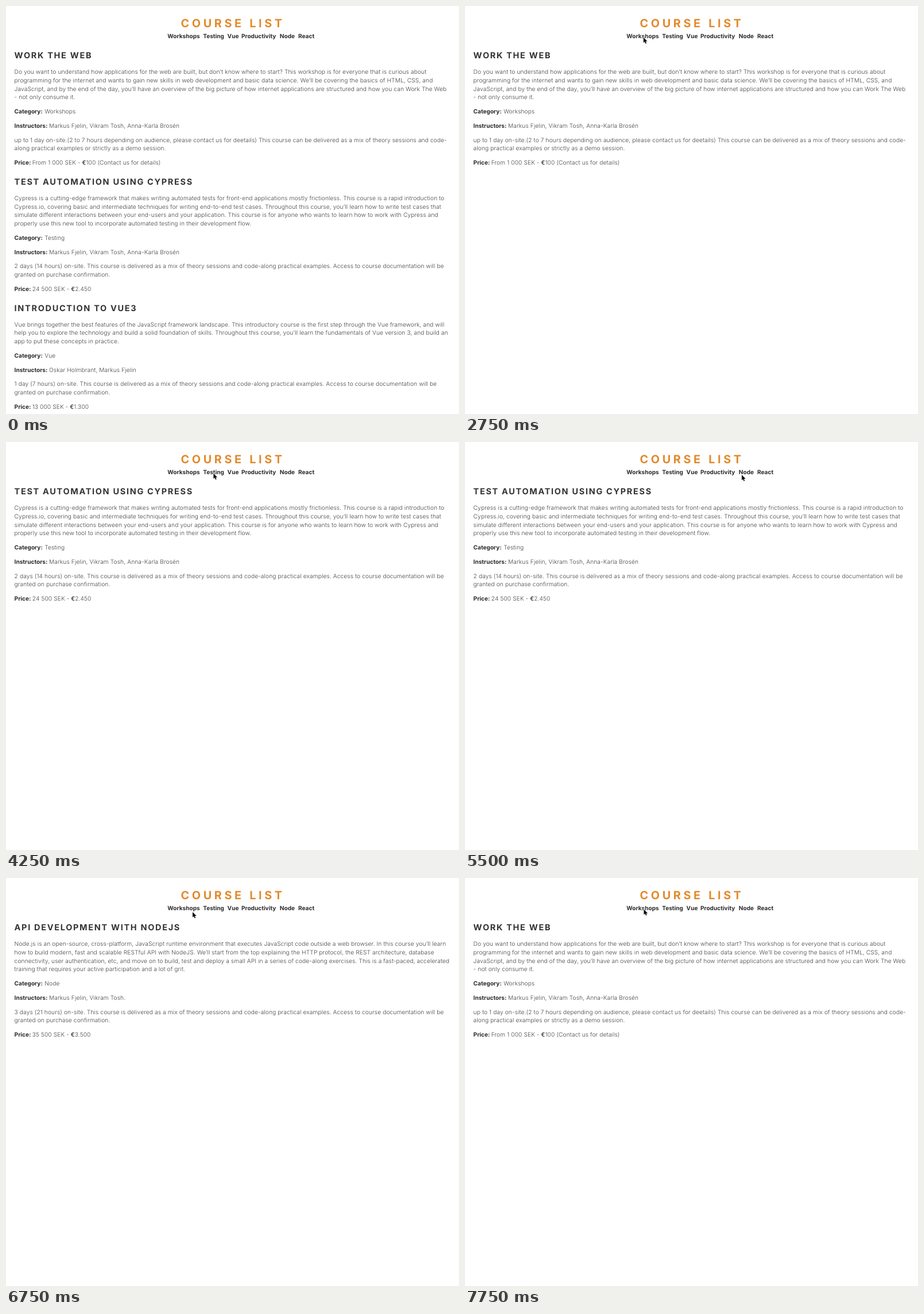
Write an HTML page that moves like this. It is 789x710 px and loops after 8000 ms.

```html
<!DOCTYPE html>
<html lang="en">
<head>
<meta charset="utf-8">
<title>Course list</title>
<style>
  html, body { margin: 0; width: 100%; height: 100%; overflow: hidden; background: #fff; }
  svg { display: block; width: 789px; height: 710px; }
  text {
    font: 300 10.2px Inter, "Open Sans", sans-serif;
    letter-spacing: .108px;
    fill: #444;
    text-rendering: geometricPrecision;
    white-space: pre;
  }
  .title { font-size: 19.8px; font-weight: 700; letter-spacing: 4.68px; fill: #e28a2b; }
  .heading { font-size: 14.5px; font-weight: 700; letter-spacing: 1.68px; fill: #333; }
  .bold { font-size: 10.1px; font-weight: 700; letter-spacing: 0; fill: #2b2b2b; }
  .euro { font-weight: 500; fill: #333; }
</style>
</head>
<body>
<svg id="stage" viewBox="0 0 789 710"></svg>
<script>
const LOOP = 8000;
const LEFT = 14.6;
const LINE = 14.82;
const PARAGRAPH = 24.72;
const SECTION = 219.8;

const LABEL_TABS = { 'Category:': 67.2, 'Instructors:': 75, 'Price:': 45.7 };
const NAV = { Workshops: 281.3, Testing: 343.2, Vue: 385.6, Productivity: 410, Node: 476.8, React: 509 };

const onSite = length => [
  `${length} on-site. This course is delivered as a mix of theory sessions and code-along practical examples. Access to course documentation will be`,
  'granted on purchase confirmation.'
];

const COURSES = [
  {
    heading: 'WORK THE WEB',
    about: [
      'Do you want to understand how applications for the web are built, but don’t know where to start? This workshop is for everyone that is curious about',
      'programming for the internet and wants to gain new skills in web development and basic data science. We’ll be covering the basics of HTML, CSS, and',
      'JavaScript, and by the end of the day, you’ll have an overview of the big picture of how internet applications are structured and how you can Work The Web',
      '- not only consume it.'
    ],
    category: 'Workshops',
    instructors: 'Markus Fjelin, Vikram Tosh, Anna-Karla Brosén',
    delivery: [
      'up to 1 day on-site.(2 to 7 hours depending on audience, please contact us for deetails) This course can be delivered as a mix of theory sessions and code-',
      'along practical examples or strictly as a demo session.'
    ],
    price: 'From 1 000 SEK - €100 (Contact us for details)'
  },
  {
    heading: 'TEST AUTOMATION USING CYPRESS',
    about: [
      'Cypress is a cutting-edge framework that makes writing automated tests for front-end applications mostly frictionless. This course is a rapid introduction to',
      'Cypress.io, covering basic and intermediate techniques for writing end-to-end test cases. Throughout this course, you’ll learn how to write test cases that',
      'simulate different interactions between your end-users and your application. This course is for anyone who wants to learn how to work with Cypress and',
      'properly use this new tool to incorporate automated testing in their development flow.'
    ],
    category: 'Testing',
    instructors: 'Markus Fjelin, Vikram Tosh, Anna-Karla Brosén',
    delivery: onSite('2 days (14 hours)'),
    price: '24 500 SEK - €2.450'
  },
  {
    heading: 'INTRODUCTION TO VUE3',
    about: [
      'Vue brings together the best features of the JavaScript framework landscape. This introductory course is the first step through the Vue framework, and will',
      'help you to explore the technology and build a solid foundation of skills. Throughout this course, you’ll learn the fundamentals of Vue version 3, and build an',
      'app to put these concepts in practice.'
    ],
    category: 'Vue',
    instructors: 'Oskar Holmbrant, Markus Fjelin',
    delivery: onSite('1 day (7 hours)'),
    price: '13 000 SEK - €1.300'
  },
  {
    heading: 'API DEVELOPMENT WITH NODEJS',
    about: [
      'Node.js is an open-source, cross-platform, JavaScript runtime environment that executes JavaScript code outside a web browser. In this course you’ll learn',
      'how to build modern, fast and scalable RESTful API with NodeJS. We’ll start from the top explaining the HTTP protocol, the REST architecture, database',
      'connectivity, user authentication, etc, and move on to build, test and deploy a small API in a series of code-along exercises. This is a fast-paced, accelerated',
      'training that requires your active participation and a lot of grit.'
    ],
    category: 'Node',
    instructors: 'Markus Fjelin, Vikram Tosh.',
    delivery: onSite('3 days (21 hours)'),
    price: '35 500 SEK - €3.500'
  }
];

// Each entry: start time in ms, then the courses listed.
const VIEWS = [[0, [0, 1, 2]], [2750, [0]], [4250, [1]], [6000, [3]], [7750, [0]]];

// Each entry: start time in ms, then the pointer tip.
const POINTER = [
  [500, 363, 100], [750, 359, 92], [1000, 339, 60], [1250, 312.5, 55], [1500, 310.9, 54.8],
  [3250, 357, 56], [3500, 361.4, 54.8], [4500, 369, 55], [4750, 419, 56.5], [5000, 463, 57.3],
  [5250, 473, 59], [5500, 482, 57.3], [5750, 485.2, 56.2], [6250, 450, 57.3], [6500, 350, 64],
  [6750, 325, 59.3], [7000, 315, 56.3], [7250, 311.5, 54.6]
];

const stage = document.getElementById('stage');

function add(parent, tag, attributes = {}) {
  const node = document.createElementNS('http://www.w3.org/2000/svg', tag);
  for (const [key, value] of Object.entries(attributes)) node.setAttribute(key, value);
  return parent.appendChild(node);
}

function write(parent, x, y, content, style = '') {
  const line = add(parent, 'text', { x, y, class: style });
  for (const part of content.split(/(€)/)) {
    add(line, 'tspan', part === '€' ? { class: 'euro' } : {}).textContent = part;
  }
}

function buildCourse(course) {
  const group = add(stage, 'g');
  let y = 118;
  const paragraph = lines => {
    lines.forEach((line, i) => write(group, LEFT, y + i * LINE, line));
    y += (lines.length - 1) * LINE + PARAGRAPH;
  };
  const field = (label, value) => {
    write(group, LEFT, y, label, 'bold');
    write(group, LABEL_TABS[label], y, value);
    y += PARAGRAPH;
  };
  write(group, LEFT, 91.2, course.heading, 'heading');
  paragraph(course.about);
  field('Category:', course.category);
  field('Instructors:', course.instructors);
  paragraph(course.delivery);
  field('Price:', course.price);
  return group;
}

write(stage, 304.4, 36.9, 'COURSE LIST', 'title');
for (const [label, x] of Object.entries(NAV)) write(stage, x, 56.2, label, 'bold');
const groups = COURSES.map(buildCourse);
const pointer = add(stage, 'path', {
  d: 'M0 0V9.2L2.1 7.3L3.6 10.7L5.2 10L3.7 6.8H6.7Z',
  fill: '#000', stroke: '#fff', 'stroke-width': 1.3, 'paint-order': 'stroke'
});

const current = (steps, time) => steps.filter(([start]) => start <= time).pop();

function render(time) {
  const [, shown] = current(VIEWS, time);
  groups.forEach((group, i) => {
    const slot = shown.indexOf(i);
    group.setAttribute('display', slot < 0 ? 'none' : 'inline');
    group.setAttribute('transform', `translate(0 ${Math.max(slot, 0) * SECTION})`);
  });
  const tip = current(POINTER, time);
  pointer.setAttribute('display', tip ? 'inline' : 'none');
  if (tip) pointer.setAttribute('transform', `translate(${tip[1]} ${tip[2]})`);
}

const began = performance.now();
function tick() {
  render((performance.now() - began) % LOOP);
  requestAnimationFrame(tick);
}
tick();
</script>
</body>
</html>
```
